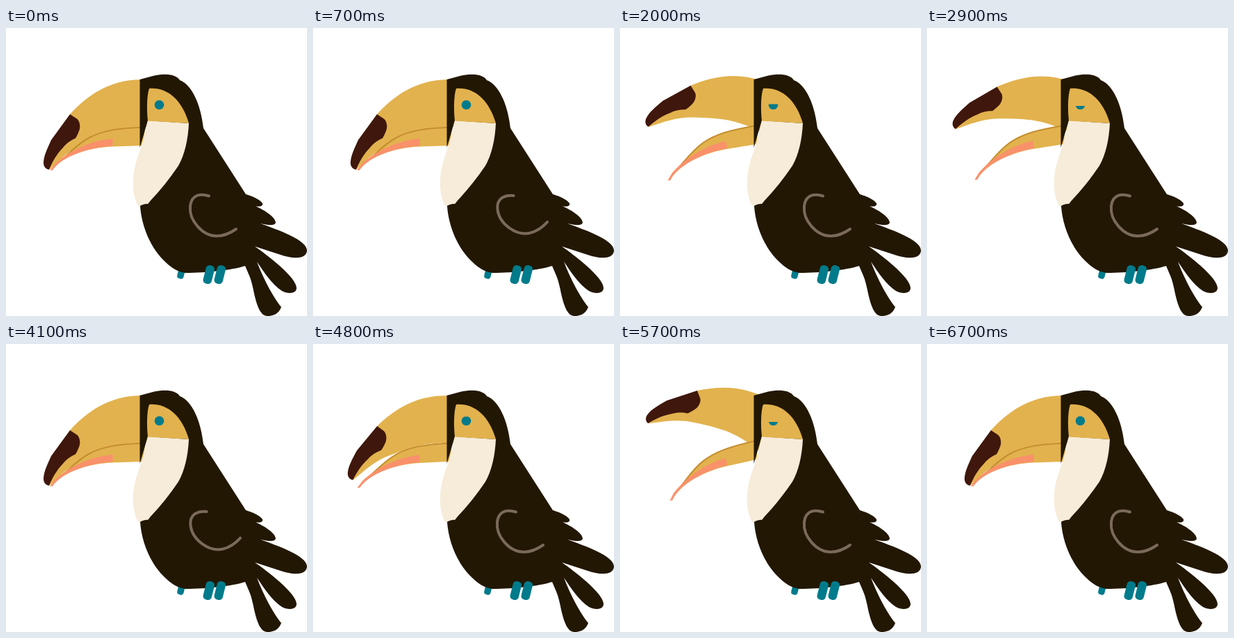
Animation, 433 px wide and 414 px high, one loop 6.8 s. Source, as an HTML page:

```html
<!DOCTYPE html>
<html lang="en">
<head>
<meta charset="utf-8">
<title>Toucan</title>
<style>
  html, body { margin: 0; width: 100%; height: 100%; overflow: hidden; background: #fff; }
  svg { display: block; width: 100vw; height: 100vh; }
  .gold { fill: #e2b24e; }
  .dark { fill: #221703; }
  .teal { fill: #007b8b; }
  .line { fill: none; stroke-linecap: round; }
</style>
</head>
<body>
<svg viewBox="0 0 433 414">
  <g id="upper">
    <path class="gold" d="M92 124 C118 96 148 75 194 74 L215 142 L194 142 C178 142.500 160 146 150 150 C138 154 118 162 104.500 169 C95 174.500 88 180 80 187 L62.500 203.500 L58 192 Z"/>
    <path fill="#3f170c" d="M92 124 L102 130.500 C106.500 134 107.500 143 105 148 C103 153 101.500 156 100 158.500 C92 162 87 166 82 172 C73 181 67 192 62 203.500 C57 203 54 199 54 194 C54 184 60 172 65 161 Z"/>
  </g>
  <g id="lower">
    <path class="gold" d="M70 196 C86 185 101 167 120 157 C140 146.500 162 143.500 200 142 L198 169 L153 170.500 C120 172 95 181 79 192 Z"/>
    <path class="line" stroke="#c48e2f" stroke-width="2" d="M72 195 C87 185 101 167.500 120 157.500 C140 147 162 144 200 142.500"/>
    <path fill="#f9916a" d="M63 204.500 L70 195.500 C88 179 118 162 153.500 159 L153.500 169.500 C122 171.500 95 181 79 192.500 C73 197 70 200 67 204.500 Z"/>
  </g>
  <rect class="teal" x="247.300" y="343.500" width="9.500" height="17" rx="4" transform="rotate(14 252 352)"/>
  <path class="dark" d="M192.500 74 L213 68.500 C228 65 245 66 250 75 C268 82 280 110 284 144 L345 239 C355 242 366 247 369 252 C370 257 364 257 359 256 C372 262 388 272 388 280 C386 285 375 283 366 281 C390 290 433 304 433 320 C432 333 412 332 395 326 L358 314 C375 326 418 358 418 374 C417 383 405 382 397 378 C382 368 372 352 361 336 C370 360 385 388 396 401 C392 412 383 414 376 414 C366 414 361 399 357 382 C355 372 353 363 350 356 L344 342 C325 348 290 352 258 352 C245 350 236 343 230 337 C208 317 195 285 193 256 L206 200 L210 133 L204 133 L192.500 172 Z"/>
  <path fill="#f6ecd9" d="M204 133 L263 137 C262 160 257 182 248 198 C236 216 222 233 208 248 L204 253 C199 252 194 256 190 256 C184 244 182 230 183 220 C183 205 187 192 192 178 C197 165 200 148 204 133 Z"/>
  <path class="gold" d="M206 87 C232 85 253 103 263 137 L204 133.500 C202 115 203 95 206 87 Z"/>
  <circle class="teal" cx="220.500" cy="110.500" r="6.800"/>
  <rect id="lid" class="gold" x="212" y="102" width="17" height="1"/>
  <path id="wing" class="line" stroke="#7a6a5a" stroke-width="4" d="M292 241.500 C282 238 267 238 265 256 C263 277 283 299 303 299 C315 299 324 294 331 289"/>
  <rect class="teal" x="285.500" y="341" width="12.500" height="27" rx="5" transform="rotate(14 291.700 354.500)"/>
  <rect class="teal" x="301.500" y="341" width="12.500" height="27" rx="5" transform="rotate(14 307.700 354.500)"/>
</svg>
<script>
const LOOP = 3400, STEP = 100;
const get = id => document.getElementById(id);
const upper = get('upper'), lower = get('lower'), wing = get('wing'), lid = get('lid');

const ramp = (t, from, to) => Math.min(1, Math.max(0, (t - from) / (to - from)));
// Rises linearly from a to b, holds, then falls linearly from c to d.
const pulse = (t, a, b, c, d) => ramp(t, a, b) - ramp(t, c, d);
const turn = (part, angle, x, y) => part.setAttribute('transform', `rotate(${angle} ${x} ${y})`);

function draw(now) {
  const t = Math.floor(now / STEP) * STEP % LOOP;
  const open = pulse(t, 1300, 2300, 2700, 3300);
  turn(upper, 35.7 * open, 190, 125);
  turn(lower, -10.5 * open, 180, 168);
  turn(wing, -20 * pulse(t, 0, 400, 400, 1200), 288, 256.3);
  lid.setAttribute('height', 1.5 + 8.5 * pulse(t, 1300, 2300, 2900, 3300));
}

const start = performance.now();
function tick() {
  draw(performance.now() - start);
  requestAnimationFrame(tick);
}
tick();
</script>
</body>
</html>
```
